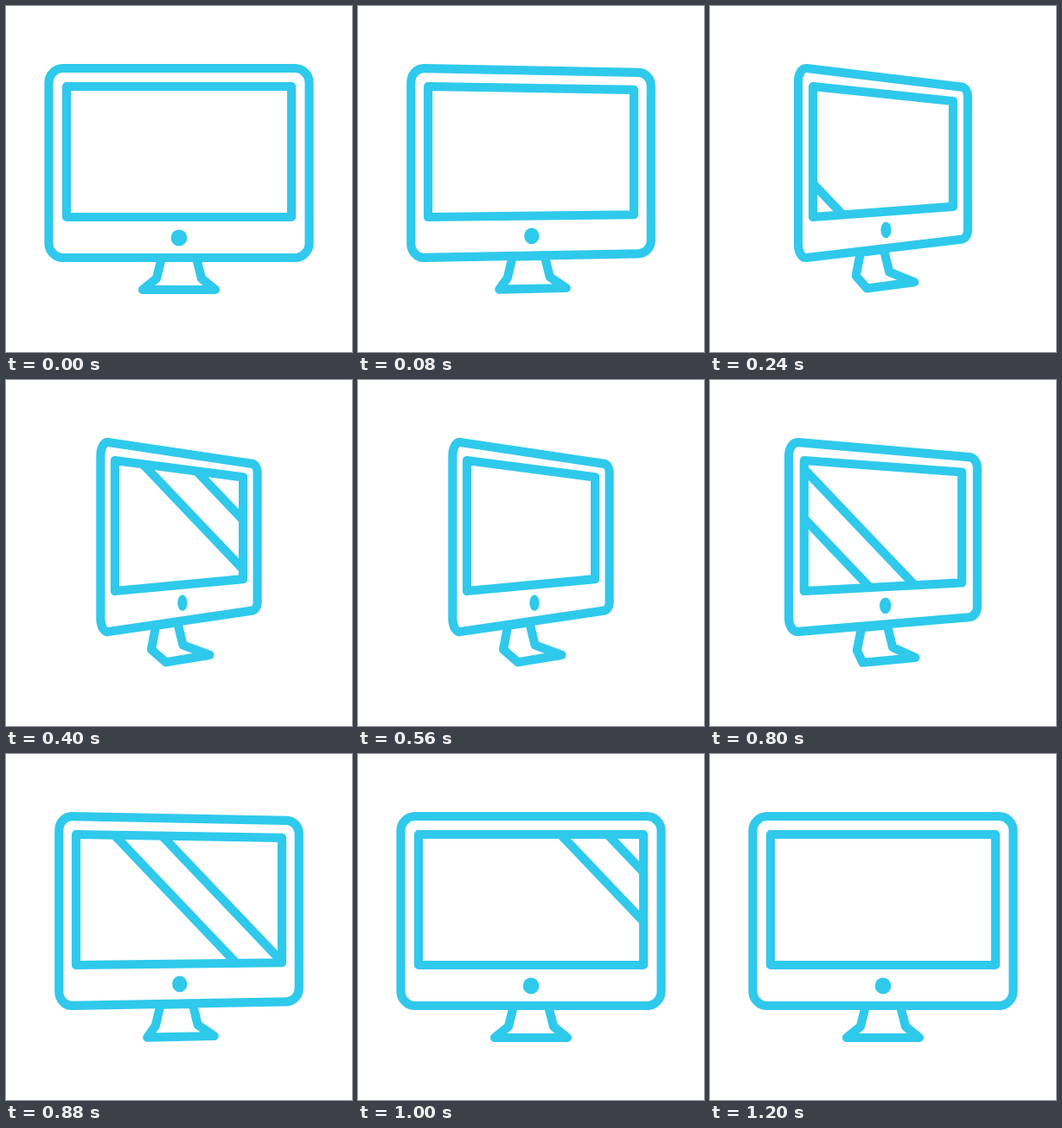
An HTML page for the animation above (1320 ms loop, 400 px wide and 400 px high).

```html
<!DOCTYPE html>
<html lang="en">
<head>
<meta charset="utf-8">
<title>Turning monitor</title>
<style>
  html, body { margin: 0; width: 100%; height: 100%; overflow: hidden; background: #fff; }
  svg { display: block; width: 100vw; height: 100vh; }
  .line { fill: none; stroke: #2fc9ec; stroke-width: 10.2; stroke-linecap: round; stroke-linejoin: round; }
  #button { fill: #2fc9ec; }
</style>
</head>
<body>
<svg viewBox="0 0 400 400">
  <clipPath id="glass"><path id="pane"/></clipPath>
  <g clip-path="url(#glass)"><path id="glare" class="line"/></g>
  <path id="stand" class="line"/>
  <path id="body" class="line"/>
  <path id="screen" class="line"/>
  <ellipse id="button" ry="9.4"/>
</svg>
<script>
const LOOP = 1320, STEP = 40, LAST = 1200, TURN = 480;
const MID = 200, RADIUS = 16.5, SLOPE = 1.05, GAP = 57;

// Front rectangle, then how far the turn narrows it and tilts its edges.
const body = { left: 49.5, top: 72, bottom: 291, narrow: 60.5, grow: 1.3, fall: 26, rise: 25.5 };
const screen = { left: 70, top: 93, bottom: 244, narrow: 56.5, grow: 0, fall: 19.6, rise: 14 };

// Levels of the stand: half width in front and turned, height, sideways shift, lift.
const levels = [
  { front: 20, turned: 12.5, y: 291, shift: -14.5, lift: 9 },
  { front: 26, turned: 18.2, y: 315, shift: -13.8, lift: 6 },
  { front: 42, turned: 25.2, y: 328, shift: 10.2, lift: 6 }
];

const sweeps = [
  { start: 60, end: 630, from: 257, to: -250 },
  { start: 480, end: 1200, from: 256, to: -248 }
];

const el = id => document.getElementById(id);
const smooth = s => s * s * (3 - 2 * s);
const mix = (a, b, f) => a + (b - a) * f;
const polygon = points => `M${points.join('L')}Z`;

// cubic-bezier(.33, 0, 0, 1), solved by bisection
function ease(x) {
  let lo = 0, hi = 1;
  for (let i = 0; i < 24; i++) {
    const s = (lo + hi) / 2;
    if (.99 * s * (1 - s) ** 2 + s ** 3 < x) lo = s; else hi = s;
  }
  return smooth(hi);
}

function corners(q, p) {
  const l = q.left + q.narrow * p, r = 2 * MID - l;
  return [
    [l, q.top - q.grow * p], [r, q.top + q.fall * p],
    [r, q.bottom - q.rise * p], [l, q.bottom + q.grow * p]
  ];
}

function toward(a, b, dist) {
  const f = dist / Math.hypot(b[0] - a[0], b[1] - a[1]);
  return [mix(a[0], b[0], f), mix(a[1], b[1], f)];
}

// Corner radii shrink with the turn, more on the far (right) side.
function rounded(points, p) {
  return points.map((c, k) => {
    const far = k === 1 || k === 2;
    const rx = RADIUS * (1 - (far ? .64 : .47) * p);
    const ry = RADIUS * (1 - (far ? .5 : 0) * p);
    const [a, b] = k % 2 ? [rx, ry] : [ry, rx];
    const prev = points[(k + 3) % 4], next = points[(k + 1) % 4];
    return `${k ? 'L' : 'M'}${toward(c, prev, a)}C${toward(c, prev, a * .45)} `
      + `${toward(c, next, b * .45)} ${toward(c, next, b)}`;
  }).join('') + 'Z';
}

function standPath(p) {
  const side = dir => levels.map(v => [
    MID + v.shift * p + dir * mix(v.front, v.turned, p),
    v.y - (v.lift + dir * v.front * .1) * p
  ]);
  return polygon([...side(-1), ...side(1).reverse()]);
}

function glarePath(t) {
  const line = c => `M0,${c}L400,${c + 400 * SLOPE}`;
  return sweeps.filter(s => t > s.start && t < s.end).map(s => {
    const c = mix(s.from, s.to, smooth((t - s.start) / (s.end - s.start)));
    return line(c) + line(c - GAP);
  }).join('');
}

function draw(t) {
  const x = 1 - Math.abs(t - TURN) / TURN;
  const p = x > 0 ? ease(x) : 0;
  const set = (id, attrs) => {
    for (const k in attrs) el(id).setAttribute(k, attrs[k]);
  };
  const glass = polygon(corners(screen, p));
  set('body', { d: rounded(corners(body, p), p) });
  set('screen', { d: glass });
  set('pane', { d: glass });
  set('stand', { d: standPath(p) });
  set('glare', { d: glarePath(t) });
  set('button', { cx: MID + 4 * p, cy: 268 - 10.4 * p, rx: 9.4 - 3.8 * p });
}

const begin = performance.now();
function tick() {
  const t = (performance.now() - begin) % LOOP;
  draw(Math.min(LAST, Math.floor((t + 1) / STEP) * STEP));
  requestAnimationFrame(tick);
}
tick();
</script>
</body>
</html>
```
